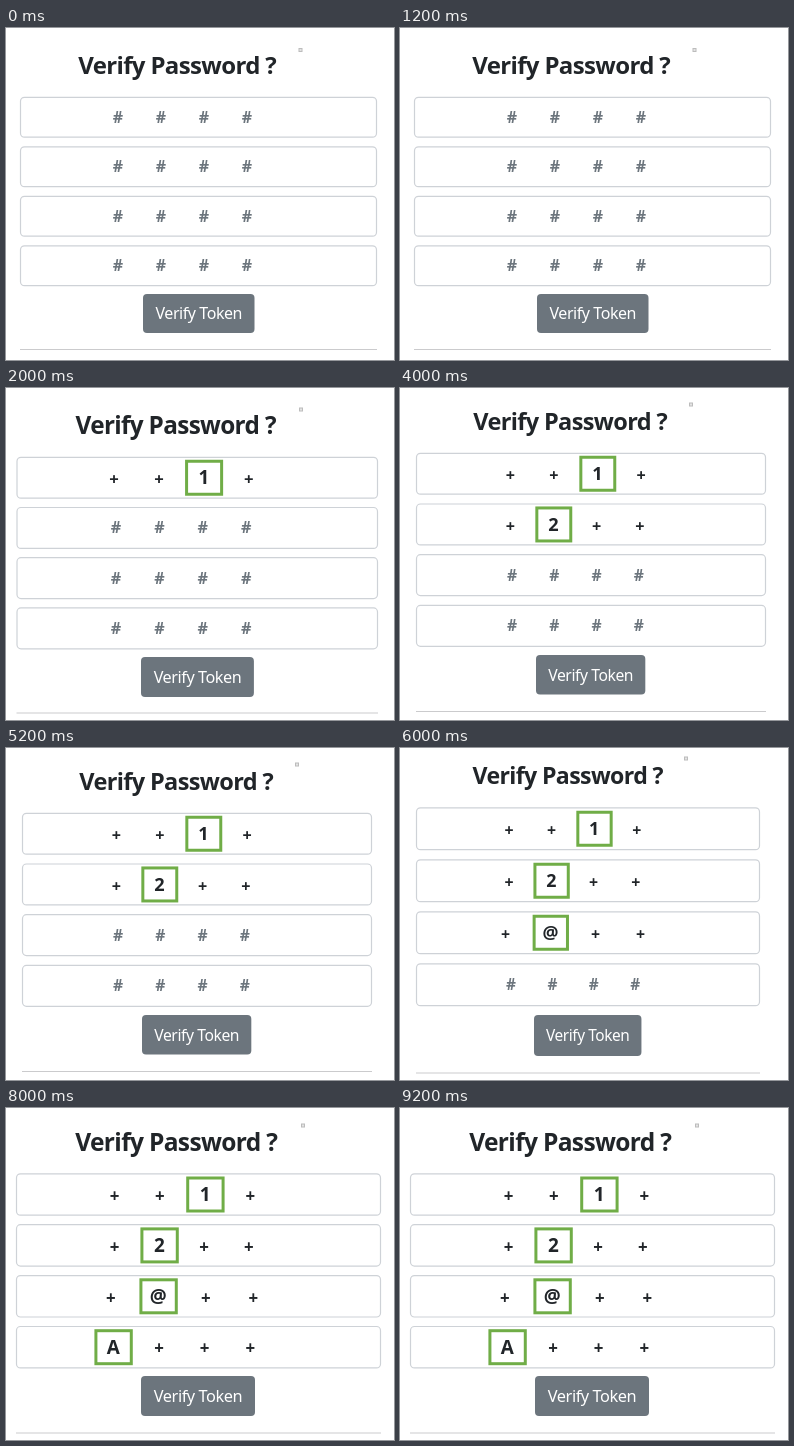
Animation, 388 px wide and 332 px high, one loop 10000 ms. Source, as an HTML page:

```html
<!DOCTYPE html>
<html lang="en">
<head>
<meta charset="utf-8">
<title>Verify Password</title>
<style>
  html, body { margin: 0; width: 100%; height: 100%; overflow: hidden; background: #fff; }
  svg { display: block; }
  text { font-family: "Noto Sans", "Open Sans", sans-serif; text-anchor: middle; white-space: pre; }
  .title, .sign { font-weight: 700; fill: #212529; }
  .title, .label { letter-spacing: -.027em; }
  .hidden { fill: #6c757d; }
  .field { fill: #fff; stroke: #ced2d7; stroke-width: 1.2; }
  .found { fill: #fff; stroke: #70ad47; stroke-width: 3; }
  .button { fill: #6c757d; }
  .label { fill: #fff; }
  .rule { stroke: #cbcbcd; stroke-width: 1.2; }
  .dot { fill: #e4e4e4; stroke: #bcbcbc; }
</style>
</head>
<body>
<svg id="stage" width="388" height="332" viewBox="0 0 388 332"></svg>
<script>
const STEP = 2000, BASE_WIDTH = 357;

// rows: [signs, first x, spacing]; title: [centre x, baseline]; button: [x, y, height]
const states = [
  { left: 14, right: 371, top: 69, pitch: 49.5, height: 40.5, title: [171.2, 46], dot: [294.5, 22],
    button: [137, 266, 39], rule: 321.5,
    rows: [["####", 112, 43], ["####", 112, 43], ["####", 112, 43], ["####", 112, 43]] },
  { left: 10.5, right: 372, top: 69, pitch: 50.2, height: 41.5, title: [169.7, 46], dot: [295, 21.5],
    button: [135, 269, 40], rule: 325,
    rows: [["++1+", 108, 44.9], ["####", 110, 43.4], ["####", 110, 43.4], ["####", 110, 43.4]] },
  { left: 16, right: 366, top: 65, pitch: 50.7, height: 41.5, title: [170.2, 42], dot: [291, 16.5],
    button: [136, 267, 39.5], rule: 323.5,
    rows: [["++1+", 110.3, 43.6], ["+2++", 110.3, 43.2], ["####", 112, 42.3], ["####", 112, 42.3]] },
  { left: 16, right: 360, top: 59.5, pitch: 52, height: 42.5, title: [167.7, 35.5], dot: [286, 10.5],
    button: [134, 267, 41], rule: 325,
    rows: [["++1+", 109, 42.6], ["+2++", 109, 42.3], ["+@++", 105.5, 45], ["####", 111, 41.4]] },
  { left: 10, right: 375, top: 65.5, pitch: 50.9, height: 42, title: [170.3, 43], dot: [297, 17.5],
    button: [135, 268, 40], rule: 325,
    rows: [["++1+", 108.5, 45.3], ["+2++", 108.5, 44.8], ["+@++", 104.8, 47.5], ["A+++", 107.3, 45.7]] }
];

const stage = document.getElementById("stage");

function add(parent, tag, attrs, content = "") {
  const el = document.createElementNS("http://www.w3.org/2000/svg", tag);
  for (const key in attrs) el.setAttribute(key, attrs[key]);
  el.textContent = content;
  return parent.appendChild(el);
}

const box = (g, cls, x, y, width, height, rx = 0) =>
  add(g, "rect", { class: cls, x, y, width, height, rx });

const write = (g, cls, x, y, size, content) =>
  add(g, "text", { class: cls, x, y, "font-size": size }, content);

function drawSign(g, sign, x, y, scale) {
  if (sign === "#") {
    write(g, "sign hidden", x, y + 5.5, 16 * scale, sign);
  } else if (sign === "+") {
    write(g, "sign", x, y + 7.2, 16.5 * scale, sign);
  } else {
    const w = 34.6 * scale;
    box(g, "found", x - w / 2 + .3, y - 16.5, w, 33);
    write(g, "sign", x, y + 6.7, 18.5 * scale, sign);
  }
}

function build(s) {
  const g = add(stage, "g", {});
  const width = s.right - s.left, scale = width / BASE_WIDTH;

  write(g, "title", ...s.title, 24 * scale, "Verify Password ?");
  box(g, "dot", s.dot[0] - 1.5, s.dot[1] - 1.5, 3, 3);

  s.rows.forEach(([signs, x, gap], row) => {
    const y = s.top + row * s.pitch;
    box(g, "field", s.left + .5, y + .3, width - 1, s.height - .6, 4);
    [...signs].forEach((sign, i) => drawSign(g, sign, x + i * gap, y + s.height / 2, scale));
  });

  const [x, y, height] = s.button, w = 111.5 * scale;
  box(g, "button", x, y, w, height, 4);
  write(g, "label", x + w / 2, y + height / 2 + 5.8, 16 * scale, "Verify Token");
  add(g, "line", { class: "rule", x1: s.left, x2: s.right, y1: s.rule, y2: s.rule });
  return g;
}

const groups = states.map(build);
const start = performance.now();

function tick() {
  const current = Math.floor((performance.now() - start) / STEP) % groups.length;
  groups.forEach((g, i) => g.style.display = i === current ? "" : "none");
  requestAnimationFrame(tick);
}
tick();
</script>
</body>
</html>
```
